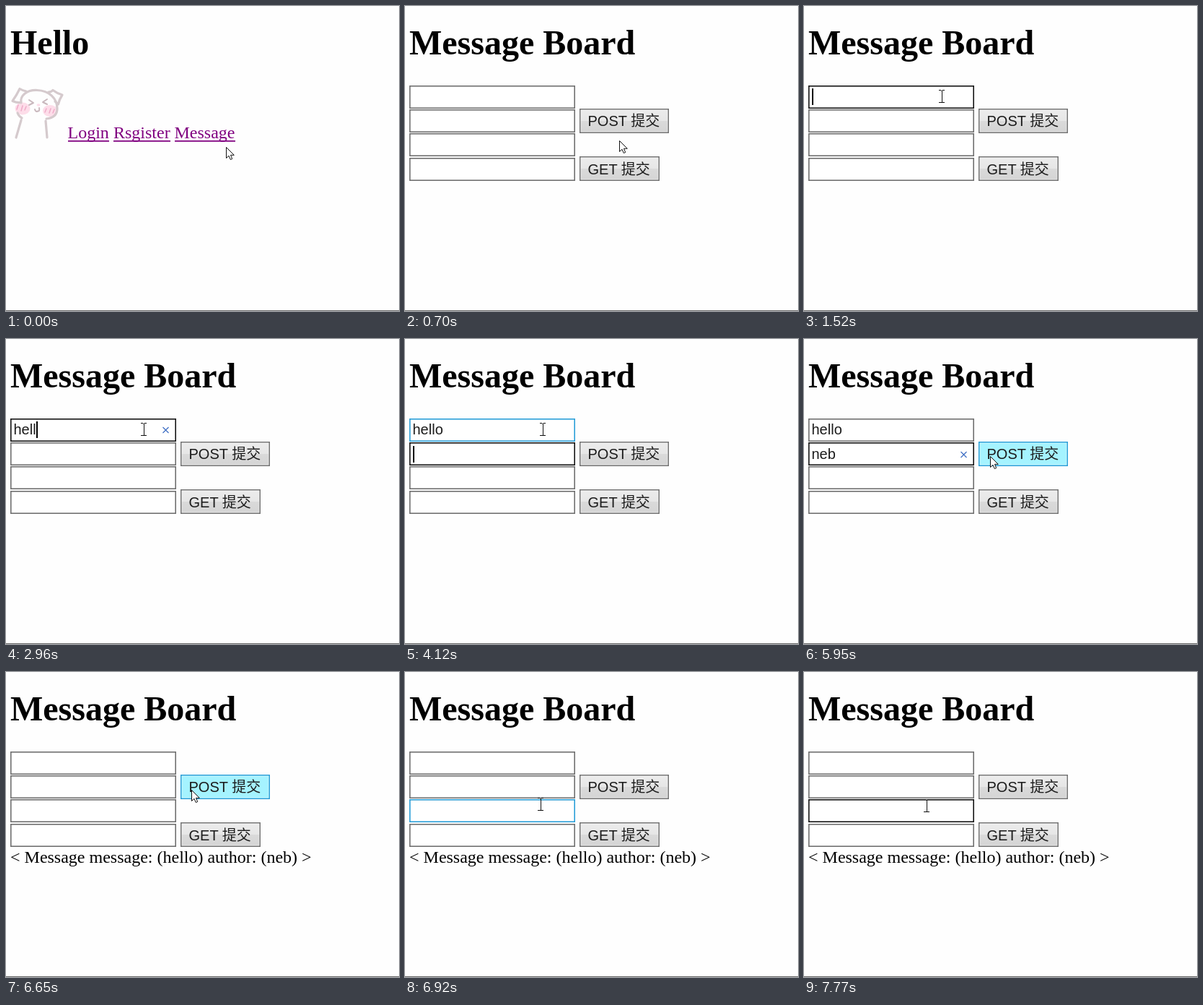
Write an HTML page that moves like this. It is 545 px wide and 422 px high and loops after 8 s.

```html
<!DOCTYPE html>
<html lang="zh-CN">
<head>
<meta charset="utf-8">
<title>Message Board</title>
<style>
html, body { margin: 0; width: 100%; height: 100%; overflow: hidden; background: #fefefe; }
svg { display: block; width: 545px; height: 422px; }
text { white-space: pre; }
h1, .h1 { font: bold 48px "Liberation Serif", "Times New Roman", serif; }
.serif { font: 24px "Liberation Serif", "Times New Roman", serif; }
.ui { font: 20px "Liberation Sans", Arial, "Noto Sans CJK SC", "Noto Sans CJK", sans-serif; fill: #1c1c1c; }
.link { fill: #800080; }
.box { fill: #fff; stroke: #707070; stroke-width: 1.6; }
.box.hover { stroke: #2a9fd8; }
.box.focus { stroke: #141414; }
.btn { fill: url(#face); stroke: #737373; stroke-width: 1.6; }
.btn.hover { fill: #a5f3ff; stroke: #2a9fd8; }
.btn.press { fill: #79d9f2; }
.doodle { fill: none; stroke: #d5cacd; stroke-width: 3.2; stroke-linecap: round; stroke-linejoin: round; }
.blush { fill: #fddde9; }
.scratch { fill: none; stroke: #efabc8; stroke-width: 1.5; stroke-linecap: round; }
.face { fill: none; stroke: #c9b8bd; stroke-width: 2; stroke-linecap: round; stroke-linejoin: round; }
.cursor { fill: #fff; stroke: #111; stroke-width: 1; stroke-linejoin: round; }
</style>
</head>
<body>
<svg viewBox="0 0 545 422">
  <defs>
    <linearGradient id="face" x1="0" y1="0" x2="0" y2="1">
      <stop offset="0" stop-color="#ececec"/>
      <stop offset=".5" stop-color="#e6e6e6"/>
      <stop offset=".5" stop-color="#dadada"/>
      <stop offset="1" stop-color="#d4d4d4"/>
    </linearGradient>
  </defs>

  <g id="home">
    <text class="h1" x="6" y="67">Hello</text>
    <ellipse class="blush" cx="23" cy="142" rx="10.5" ry="8.5"/>
    <ellipse class="blush" cx="61" cy="145" rx="10" ry="8"/>
    <path class="doodle" d="M21 134C19 124 29 116 43 116.500C60 117 71 128 71 142C71 151 65 155 56 156
      M16 148Q18 153 22 155M21 158L14 182M55 159L57 182
      M28 118Q23 117 19 114.500Q15 123 9 131.500Q15 134 20 133.500
      M59 119Q63 119 65 116.500Q71 121 78 123Q74 129 72.500 136L68 132"/>
    <path class="scratch" d="M17 137l-2 6M23 138l-2 7M28 139l-2 5M56 142l-2 5M62 142l-2 6M67 143l-2 5"/>
    <path class="face" d="M32 130L38 134L32 137M57 129L51 133L57 136M40 143Q41 147 44 145.500Q47 146 46 141"/>
    <ellipse class="blush" cx="45" cy="137" rx="2.500" ry="1.800"/>
    <g class="serif link">
      <text x="85.500" y="183">Login</text>
      <text x="149" y="183">Rsgister</text>
      <text x="233.500" y="183">Message</text>
      <path d="M86 186h57v1.700h-57zM149 186h79v1.700h-79zM234 186h84v1.700h-84z"/>
    </g>
  </g>

  <g id="board">
    <text class="h1" x="6" y="67">Message Board</text>
    <g id="fields"></g>
    <g id="buttons"></g>
    <path id="clear" d="M-4 -4L4 4M4 -4L-4 4" fill="none" stroke="#3f6fc4" stroke-width="1.200"/>
    <rect id="caret" width="2" height="23" fill="#000"/>
    <text id="note" class="serif" x="6" y="264">&lt; Message message: (hello) author: (neb) &gt;</text>
  </g>

  <path d="M0 421.500H545" stroke="#666"/>

  <path id="arrow" class="cursor" d="M.5 .5V15.500L4 12.300L6.300 17.500L8.700 16.500L6.500 11.300H11.300Z"/>
  <path id="beam" class="cursor" fill="none" d="M-4 -8.500H-1L0 -7.500L1 -8.500H4M.5 -8V8M-4 8.500H4"/>
  <path id="hand" class="cursor" d="M6.500 13.500V2Q6.500 .5 8 .5Q9.500 .5 9.500 2V8Q12 6.500 12.500 9Q15 7.500 15.500 10Q18.500 9 18.500 12V16
    Q18.500 18 17 20V22.500H7.500V20.500Q4 17 1 12.500Q.5 10 3 10.500Z"/>
</svg>
<script>
const LOOP = 8000;
const $ = id => document.getElementById(id);

function add(parent, tag, attrs, content) {
  const el = document.createElementNS("http://www.w3.org/2000/svg", tag);
  for (const key in attrs) el.setAttribute(key, attrs[key]);
  if (content) el.textContent = content;
  parent.append(el);
  return el;
}

const frame = (x, y, w, h, cls) =>
  ({ x: x + .8, y: y + .8, width: w - 1.6, height: h - 1.6, class: cls });

const fields = [110, 143, 176, 210].map(y => ({
  x: 6, y, w: 230, h: 32,
  box: add($("fields"), "rect", frame(6, y, 230, 32, "box")),
  text: add($("fields"), "text", { class: "ui", x: 10.5, y: y + (y === 143 ? 23 : 22) })
}));

const buttons = [["POST 提交", 142, 124], ["GET 提交", 208, 111]].map(([label, y, w]) => {
  const box = add($("buttons"), "rect", frame(242, y, w, 34, "btn"));
  add($("buttons"), "rect", { x: 244, y: y + 2, width: w - 4, height: 30,
    fill: "none", stroke: "#fff", "stroke-opacity": .45 });
  add($("buttons"), "text", { class: "ui", x: 253.5, y: y + (y === 142 ? 24 : 25) }, label);
  return { x: 242, y, w, h: 34, box };
});

// Each step changes part of the state from its time on.
const steps = [
  [0, { page: "home", at: [305, 195], texts: ["", ""], focus: -1, caret: 0, note: false, press: false }],
  [90, { at: [289, 188] }],
  [520, { at: [287, 186], hand: true }],
  [700, { page: "board", at: [297, 186], hand: false }],
  [1070, { at: [287, 170] }],
  [1160, { at: [262, 154] }],
  [1250, { at: [222, 136] }],
  [1340, { at: [191, 125] }],
  [1430, { focus: 0 }],
  [1520, { caret: 1 }],
  ...fade(1890, 1980, 2080),
  [2320, { texts: ["h", ""], caret: 1 }],
  [2410, { texts: ["he", ""] }],
  [2680, { texts: ["hel", ""] }],
  [2960, { texts: ["hell", ""] }],
  [3150, { texts: ["hello", ""] }],
  ...fade(3580, 3660, 3750),
  [4120, { focus: 1, caret: 1 }],
  [4460, { caret: .65 }],
  [4550, { texts: ["hello", "n"], caret: 1 }],
  [4640, { texts: ["hello", "ne"] }],
  [4730, { texts: ["hello", "neb"] }],
  ...fade(5100, 5180, 5250),
  [5620, { at: [196, 129] }],
  [5700, { at: [213, 140] }],
  [5790, { at: [234, 152] }],
  [5870, { at: [252, 160] }],
  [5950, { at: [258, 162] }],
  [6130, { focus: -1, press: true }],
  [6220, { texts: ["", ""], press: false, note: true }],
  [6590, { at: [257, 162] }],
  [6650, { at: [257, 163] }],
  [6740, { at: [244, 169] }],
  [6830, { at: [216, 178] }],
  [6920, { at: [188, 183] }],
  [7010, { at: [170, 185] }],
  [7100, { focus: 2 }],
  [7190, { caret: 1 }],
  ...fade(7590, 7680, 7770)
];

function fade(a, b, c) {
  return [[a, { caret: .65 }], [b, { caret: .3 }], [c, { caret: 0 }]];
}

const inside = (r, [x, y]) => x >= r.x && x < r.x + r.w && y >= r.y && y < r.y + r.h;
const show = (el, on) => { el.style.display = on ? "" : "none"; };
const place = (el, x, y) => el.setAttribute("transform", `translate(${x} ${y})`);

function draw(s) {
  const onBoard = s.page === "board";
  show($("home"), !onBoard);
  show($("board"), onBoard);
  show($("note"), s.note);

  fields.forEach((f, i) => {
    f.text.textContent = s.texts[i] || "";
    f.box.classList.toggle("hover", inside(f, s.at));
    f.box.classList.toggle("focus", i === s.focus);
  });
  buttons.forEach(b => {
    const over = inside(b, s.at);
    b.box.classList.toggle("hover", over);
    b.box.classList.toggle("press", over && s.press);
  });

  const active = fields[s.focus];
  const value = s.texts[s.focus] || "";
  show($("clear"), value);
  show($("caret"), active);
  if (active) {
    const width = value && onBoard ? active.text.getComputedTextLength() : 0;
    const top = active.y + (s.focus === 1 ? 5 : 4);
    place($("caret"), 11 + Math.floor(width), top);
    $("caret").setAttribute("opacity", s.caret);
    place($("clear"), 221.5, top + 12);
  }

  const beam = onBoard && fields.some(f => inside(f, s.at));
  const kind = s.hand ? "hand" : beam ? "beam" : "arrow";
  for (const id of ["arrow", "beam", "hand"]) show($(id), id === kind);
  place($(kind), ...s.at);
}

function stateAt(t) {
  const s = {};
  for (const [time, change] of steps) if (time <= t) Object.assign(s, change);
  return s;
}

const start = performance.now();
function tick() {
  draw(stateAt((performance.now() - start) % LOOP));
  requestAnimationFrame(tick);
}
tick();
</script>
</body>
</html>
```
